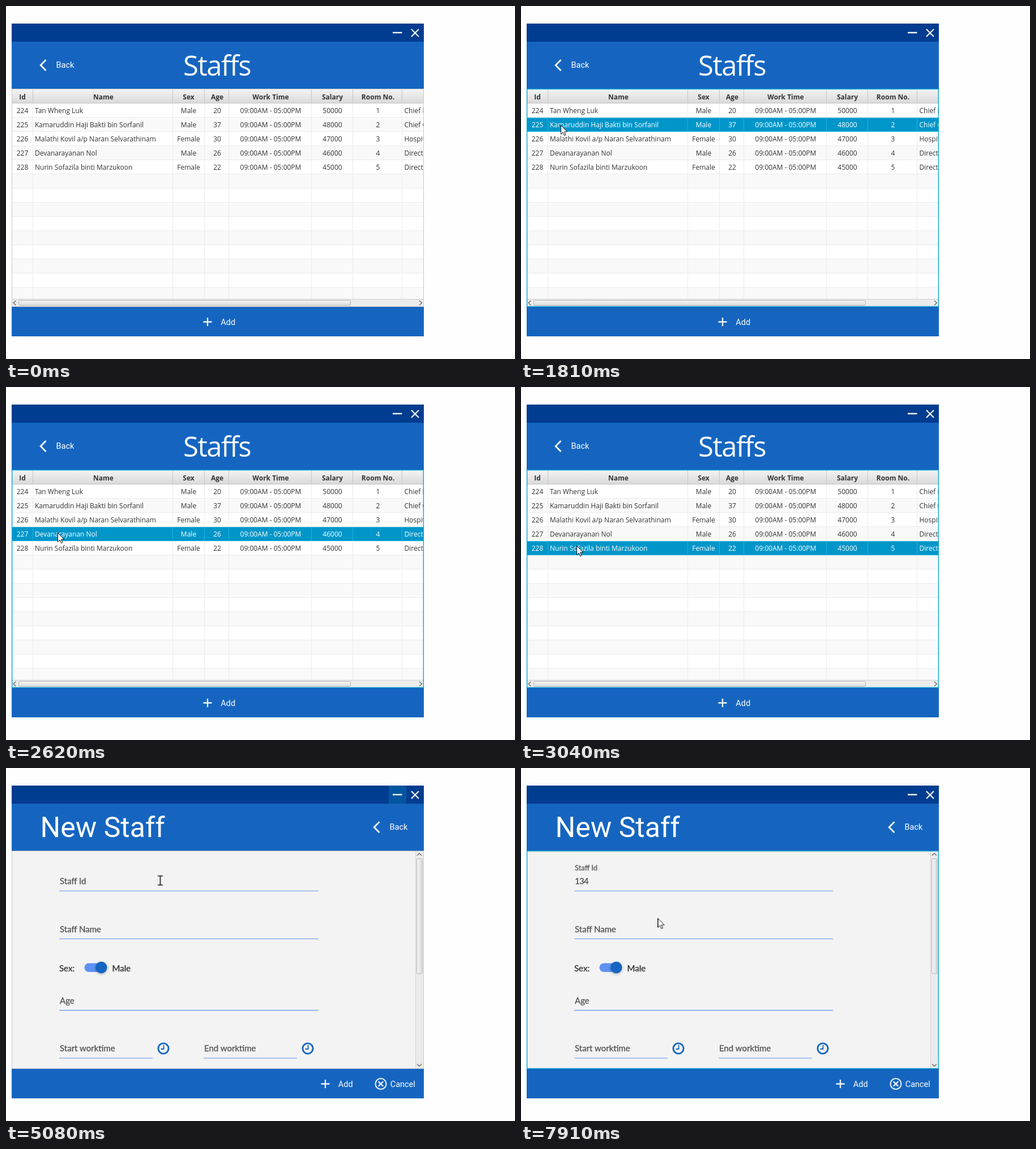
An HTML page that plays this animation: 899x623 px, repeating every 8 s.

```html
<!DOCTYPE html>
<html lang="en">
<head>
<meta charset="utf-8">
<title>Staff records</title>
<style>
  html, body { margin: 0; width: 100%; height: 100%; overflow: hidden; background: #fefefe; }
  svg { display: block; position: absolute; left: 0; top: 0; }
  text { white-space: pre; }
  .mid { text-anchor: middle; }
  .table text { font: 12px "Open Sans", "Noto Sans", sans-serif; }
  .table .head { font-weight: 700; fill: #333; }
  .bar { font: 14.5px Roboto, sans-serif; fill: #fff; }
  .staffs { font: 49px "Open Sans", "Noto Sans", sans-serif; letter-spacing: -1.5px; fill: #fff; }
  .new { font: 50px Roboto, sans-serif; fill: #fff; }
  .form text { font: 15px Lato, sans-serif; fill: #4c4c4c; stroke: #4c4c4c; stroke-width: .25px; }
  .form .dark { fill: #2b2b2b; stroke: #2b2b2b; }
  .form #typed { letter-spacing: -.7px; }
  .icon { fill: none; stroke: #f1f5fc; stroke-width: 2.3; }
  .tick { fill: none; stroke: #5c5c5c; stroke-width: 1.1; }
  .underline { stroke: #5e92f3; stroke-width: 1.2; }
  .ring { fill: none; stroke: #0aa3d3; stroke-width: 1.4; }
  .edge { fill: none; stroke: #c8c8c8; }
</style>
</head>
<body>
<svg width="899" height="623" viewBox="0 0 899 623">
  <defs>
    <linearGradient id="headFill" x2="0" y2="1">
      <stop stop-color="#f3f3f3"/><stop offset="1" stop-color="#d9d9d9"/>
    </linearGradient>
    <linearGradient id="thumbFill" x2="0" y2="1">
      <stop stop-color="#f6f6f6"/><stop offset="1" stop-color="#dcdcdc"/>
    </linearGradient>
    <linearGradient id="thumbFillV">
      <stop stop-color="#f6f6f6"/><stop offset="1" stop-color="#dcdcdc"/>
    </linearGradient>
    <filter id="shadow" x="-50%" y="-50%" width="200%" height="200%">
      <feDropShadow dx="0" dy="1.5" stdDeviation="2" flood-opacity=".3"/>
    </filter>
    <clipPath id="pane"><rect x="10" y="146" width="727" height="371"/></clipPath>
    <clipPath id="button"><rect x="333" y="531" width="82" height="52"/></clipPath>
    <path id="chevron" class="icon" style="stroke-width:2.9" d="M11 .5 1.7 10 11 19.5"/>
    <path id="plus" class="icon" d="M-7.5 0H7.5M0-7.5V7.5"/>
    <g id="clock" fill="none" stroke="#1565c0">
      <circle r="9.1" stroke-width="2.9"/><path d="M.5-6V1H-4.5" stroke-width="1.8"/>
    </g>
  </defs>

  <rect x="10" y="31" width="728" height="32" fill="#003c8f"/>
  <rect id="minimise" x="676" y="31" width="31" height="32" fill="#02559f"/>
  <path class="icon" d="M683 47H699.5M716 41 729 54M729 41 716 54"/>
  <path d="M10 63H738V146H10ZM10 531H738V583H10Z" fill="#1565c0"/>

  <g id="list">
    <text class="staffs" x="313" y="123">Staffs</text>
    <use href="#chevron" x="59.5" y="94.5"/>
    <text class="bar" x="88.5" y="109.3">Back</text>
    <g class="table">
      <g id="grid" clip-path="url(#pane)"></g>
      <rect x="10" y="517" width="728" height="14" fill="#ececec"/>
      <path d="M10 517.5H738" stroke="#d0d0d0"/>
      <rect x="22.5" y="519.5" width="586" height="9" rx="2.5" fill="url(#thumbFill)" stroke="#b4b4b4"/>
      <path class="tick" d="M17.5 520 13 524 17.5 528M730 520 734.5 524 730 528"/>
      <rect class="edge" x="10.5" y="146.5" width="727" height="384"/>
      <rect id="tableFocus" class="ring" x="10.6" y="146.6" width="726.8" height="383.8"/>
    </g>
    <g clip-path="url(#button)">
      <rect id="hover" x="333" y="531" width="82" height="52" fill="#6496f4"/>
      <g transform="translate(395 546)"><circle id="ripple" r="45" fill="#94b6f8"/></g>
    </g>
    <use href="#plus" x="356" y="557.5"/>
    <text class="bar" x="379.3" y="562.8">Add</text>
  </g>

  <g id="entry">
    <text class="new" x="60.5" y="121.5">New Staff</text>
    <use href="#chevron" x="648.5" y="94.5"/>
    <text class="bar" x="677.5" y="109.3">Back</text>
    <rect x="10" y="146" width="728" height="385" fill="#f3f3f3"/>
    <g class="form">
      <text id="label">Staff Id</text>
      <text id="typed" class="dark" x="95" y="205.3"><tspan id="one">1</tspan><tspan id="three">3</tspan><tspan id="four">4</tspan></text>
      <rect id="caret" y="189" width="1" height="21" fill="#222"/>
      <text x="95" y="290">Staff Name</text>
      <text class="dark" x="94" y="358.5">Sex:</text>
      <rect x="138.5" y="344.5" width="37" height="15.5" rx="7.75" fill="#5e92f3"/>
      <circle cx="168.3" cy="352" r="10.3" fill="#1565c0" filter="url(#shadow)"/>
      <text class="dark" x="187.5" y="358.5">Male</text>
      <text x="95" y="416">Age</text>
      <text x="95" y="500.3">Start worktime</text>
      <text x="350" y="500.3">End worktime</text>
      <path class="underline" d="M94 217H551.5M94 301.5H551.5M94 427.7H551.5M94 512H259M349 512H514"/>
      <path id="line" d="M94 217H551.5" stroke="#1565c0" stroke-width="2"/>
      <use href="#clock" x="278" y="495"/>
      <use href="#clock" x="533" y="495"/>
    </g>
    <rect x="723.5" y="146.5" width="14" height="384" fill="#ebebeb" stroke="#d4d4d4"/>
    <rect x="725.5" y="160" width="9.5" height="203" rx="2.5" fill="url(#thumbFillV)" stroke="#b4b4b4"/>
    <path class="tick" d="M726 154.5 730 150.5 734 154.5M726 522.5 730 526.5 734 522.5"/>
    <rect class="edge" x="10.5" y="146.5" width="727" height="384"/>
    <rect id="formFocus" class="ring" x="10.6" y="146.6" width="726.8" height="383.8"/>
    <use href="#plus" x="564" y="557.5"/>
    <text class="bar" x="586.8" y="562.8">Add</text>
    <circle class="icon" cx="662" cy="557.5" r="9.5" style="stroke-width:2"/>
    <path class="icon" d="M657.7 553.2 666.3 561.8M666.3 553.2 657.7 561.8"/>
    <text class="bar" x="678.7" y="562.8">Cancel</text>
  </g>

  <g id="pointer" fill="#fff" stroke="#111" stroke-linejoin="round">
    <path id="arrow" d="M.5.5V16.2L4.1 12.9 6.6 18.6 9 17.6 6.6 12H11.7Z"/>
    <path id="hand" d="M5 13.5V2.3C5 .1 8.2.1 8.2 2.3V8C8.4 6.5 11 6.6 11.1 8.4 11.6 7.1 13.8 7.5 13.9 9.2 14.5 8.2 16.4 8.7 16.4 10.4V15.5C16.4 18 15 18.7 15 21.5H6.6C6.2 18.8 3.2 16.5 1 12.6 .1 10.7 2.3 9.8 3.5 11.3ZM8.2 8V12M11.1 8.6V12M13.9 9.6V12.5"/>
    <path id="beam" fill="none" stroke-width="1.6" d="M-4.5-8H-1Q0-8 0-7 0-8 1-8H4.5M0-7V7M-4.5 8H-1Q0 8 0 7 0 8 1 8H4.5"/>
  </g>
</svg>

<script>
const LOOP = 8000;
const ROW = 25, TOP = 172;
const edges = [47.5, 294.5, 350.5, 393.5, 539.5, 612.5, 699.5];
const centres = [29, 172, 322.5, 373, 467.5, 576.5, 657];
const heads = ["Id", "Name", "Sex", "Age", "Work Time", "Salary", "Room No."];
const staff = [
  ["Tan Wheng Luk", "Male", 20, "Chief Executive"],
  ["Kamaruddin Haji Bakti bin Sorfanil", "Male", 37, "Chief Officer"],
  ["Malathi Kovil a/p Naran Selvarathinam", "Female", 30, "Hospital Head"],
  ["Devanarayanan Nol", "Male", 26, "Director"],
  ["Nurin Sofazila binti Marzukoon", "Female", 22, "Director"],
];

const label = (x, y, value, cls = "") => `<text x="${x}" y="${y}" class="${cls}">${value}</text>`;
const rules = (y, height, colour) =>
  `<path d="${edges.map(x => `M${x} ${y}v${height}`).join("")}" stroke="${colour}"/>`;

function record(i, colour) {
  const [name, sex, age, post] = staff[i];
  const y = TOP + i * ROW + 16.6;
  const values = [224 + i, null, sex, age, "09:00AM - 05:00PM",
    i ? 49000 - i * 1000 + (i - 0 ? 0 : 0) : 50000, i + 1];
  const cells = values.map((v, c) => v === null ? label(51, y, name) : label(centres[c], y, v, "mid"));
  return `<g fill="${colour}">${cells.join("")}${label(703.5, y, post)}</g>`;
}

function band(i, fill, line) {
  const y = TOP + i * ROW;
  return `<rect x="10" y="${y}" width="728" height="${ROW}" fill="${fill}"/>` +
    rules(y, ROW, line) + `<path d="M10 ${y + ROW - .5}H738" stroke="${line}"/>`;
}

let grid = "";
for (let i = 0; i < 14; i++) grid += band(i, i % 2 ? "#f9f9f9" : "#fff", "#ebebeb");
grid += `<rect x="10" y="147" width="728" height="25" fill="url(#headFill)"/>` +
  rules(147, 25, "#c6c6c6") + `<path d="M10 171.5H738" stroke="#c4c4c4"/>` +
  heads.map((h, c) => label(centres[c], 164.6, h, "mid head")).join("");
staff.forEach((_, i) => {
  grid += record(i, "#333") +
    `<g id="selected${i}">${band(i, "#0096c9", "#20b2df")}` +
    `<path d="M10 ${TOP + i * ROW + .5}H738" stroke="#20b2df"/>${record(i, "#fff")}</g>`;
});
grid += `<g id="idle">${band(4, "#d2d2d0", "#c9c9c7")}${record(4, "#333")}</g>`;
document.getElementById("grid").innerHTML = grid;

// Stepped keyframes from [milliseconds, value] pairs.
let css = "";
function steps(id, property, points) {
  const frames = points.map(([t, v]) => `${t * 100 / LOOP}%{${property}:${v}}`).join("");
  const name = `${id}-${property}`;
  css += `@keyframes ${name}{${frames}}#${id}{animation:${name} ${LOOP}ms step-end -10ms infinite}`;
}
const show = (id, from, to = LOOP, property = "opacity") =>
  steps(id, property, [[0, 0], [from, 1], ...(to < LOOP ? [[to, 0]] : [])]);
const at = (x, y, scale = 1) => `translate(${x}px,${y}px) scale(${scale})`;

steps("list", "opacity", [[0, 1], [4250, 0]]);
show("entry", 4250);
[1400, 1800, 2200, 2620, 3040, 3860].forEach((t, i, all) => i < 5 && show(`selected${i}`, t, all[i + 1]));
show("idle", 3860);
show("tableFocus", 1400, 3860);
show("hover", 3640, 4250);
steps("ripple", "transform", [[0, "scale(0)"], [3860, "scale(.35)"], [4050, "scale(1)"], [4250, "scale(0)"]]);

show("minimise", 4250, 5690);
steps("label", "transform", [[0, at(95, 205.3)], [5690, at(95, 193, .93)], [5880, at(95, 181, .86)]]);
css += `@keyframes tint{0%{fill:#4c4c4c;stroke:#4c4c4c}71.125%{fill:#1565c0;stroke:#1565c0}96.25%{fill:#4c4c4c;stroke:#4c4c4c}}
  #label.focus{animation:label-transform 8s step-end -10ms infinite,tint 8s step-end -10ms infinite}`;
document.getElementById("label").classList.add("focus");
show("line", 5690, 7700);
show("one", 6280, LOOP, "fill-opacity");
show("three", 6680, LOOP, "fill-opacity");
show("four", 7090, LOOP, "fill-opacity");
css += "#one,#three,#four{stroke:none}";
steps("caret", "transform", [[0, at(-50, 0)], [5690, at(95, 0)], [6280, at(102.5, 0)],
  [6680, at(111, 0)], [7090, at(120, 0)], [7700, at(-50, 0)]]);
steps("formFocus", "opacity", [[0, 0], [7700, 1]]);

steps("pointer", "transform", [
  [0, [-60, -60]], [380, [772, 527]], [590, [330, 330]], [790, [84, 196]], [1000, [63.5, 188]],
  [1600, [68, 204]], [1800, [70, 210]], [2000, [80, 228]], [2200, [84, 236]], [2410, [89, 252]],
  [2620, [91, 257]], [2830, [96, 274]], [3040, [98, 280]], [3240, [140, 340]], [3440, [310, 480]],
  [3640, [386, 548]], [4250, [380, 455]], [4450, [358, 360]], [4650, [308, 260]],
  [4860, [280, 209]], [5080, [272.5, 198.5]], [6080, [255, 214]], [6280, [247, 224]],
  [7300, [245, 240]], [7500, [241.5, 265]],
].map(([t, [x, y]]) => [t, at(x, y)]));
steps("arrow", "opacity", [[0, 1], [3640, 0], [4250, 1], [4860, 0], [6280, 1]]);
show("hand", 3640, 4250);
steps("beam", "opacity", [[0, 0], [4860, 1], [6280, 0]]);

document.head.insertAdjacentHTML("beforeend", `<style>${css}</style>`);
</script>
</body>
</html>
```
